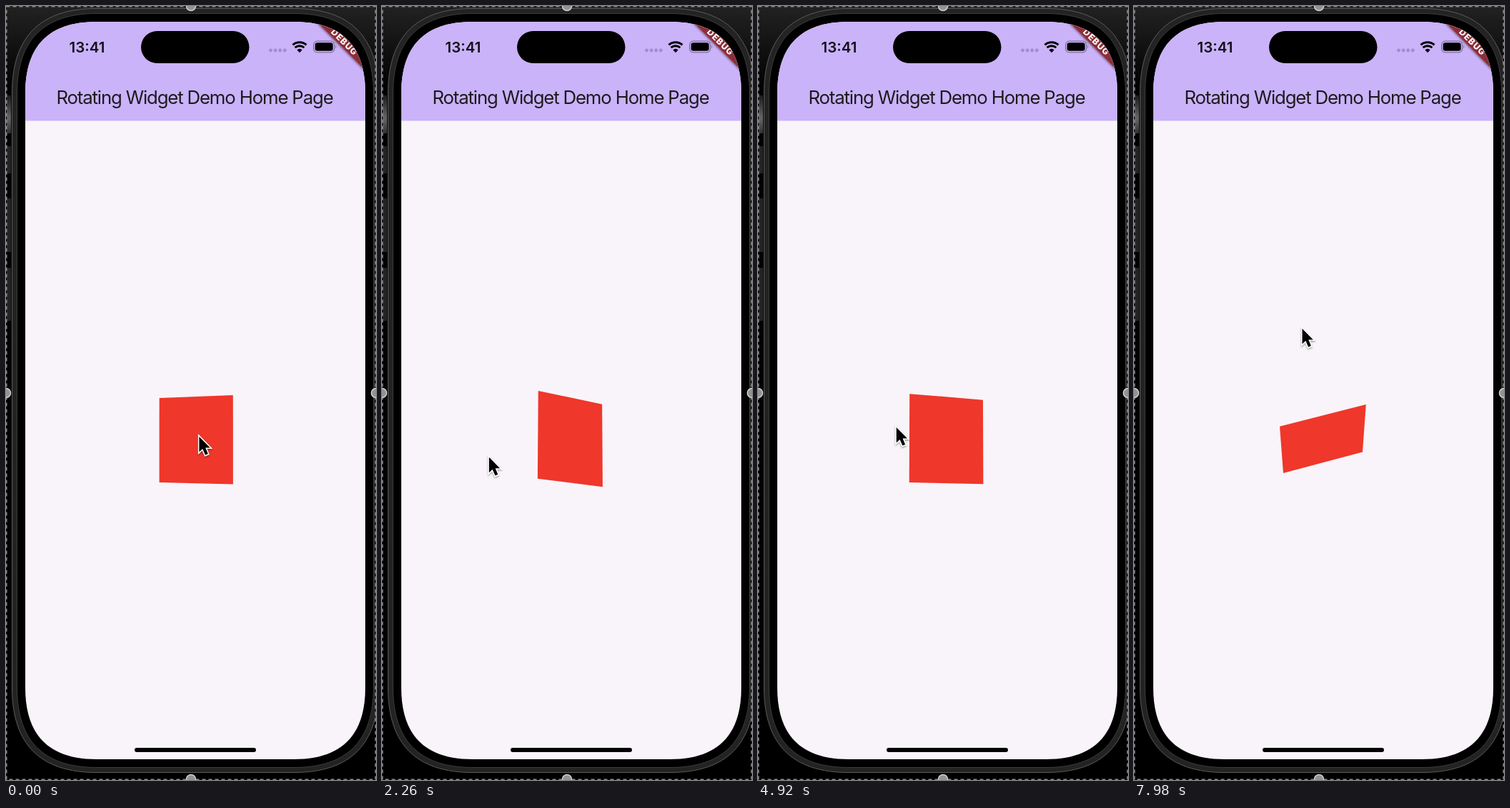
Animation, 518 px wide and 1082 px high, one loop 8 s. Source, as an HTML page:

```html
<!DOCTYPE html>
<html lang="en">
<head>
<meta charset="utf-8">
<title>Rotating Widget Demo</title>
<style>
html, body { margin: 0; width: 100%; height: 100%; overflow: hidden; background: #000; }
svg { display: block; width: 518px; height: 1082px; font-family: Inter, Roboto, sans-serif; }
</style>
</head>
<body>
<svg viewBox="0 0 518 1082">
  <defs>
    <clipPath id="screen"><path data-inset="0"/></clipPath>
    <linearGradient id="desk" x2="0" y2="1">
      <stop stop-color="#222"/><stop offset="1" stop-color="#000"/>
    </linearGradient>
    <linearGradient id="key" x2="0" y2="1">
      <stop stop-color="#1c1c1c"/><stop offset=".6" stop-color="#666"/><stop offset="1" stop-color="#333"/>
    </linearGradient>
    <filter id="shade" x="-50%" y="-50%" width="200%" height="200%">
      <feDropShadow dx="0" dy="1.5" stdDeviation="1.3" flood-opacity=".4"/>
    </filter>
  </defs>
  <rect width="518" height="1082"/>
  <rect width="518" height="120" fill="url(#desk)"/>

  <!-- side buttons and phone body -->
  <path d="M1 125h6v53h-6z" fill="url(#key)"/>
  <path d="M1 196h6v38h-6zM1 269h6v75h-6zM1 366h6v74h-6z" fill="#252525"/>
  <path data-inset="18.5" fill="#232323" stroke="#5c5c5c"/>
  <path data-inset="11.5" stroke="#3c3c3c"/>

  <g clip-path="url(#screen)">
    <path d="M27 22h476v1031h-476z" fill="#f9f4fa"/>
    <path d="M27 22h476v138.500h-476z" fill="#cab3f9"/>
    <g transform="translate(474 50.500) rotate(45)">
      <path d="M-80 -7.500h160v15h-160z" fill="#8d2f37" filter="url(#shade)"/>
      <text y="4.400" text-anchor="middle" font-size="12" font-weight="800" letter-spacing="1" fill="#fff">DEBUG</text>
    </g>
  </g>

  <!-- status bar and title -->
  <text x="113.500" y="64.500" text-anchor="middle" font-size="20.500" font-weight="600" fill="#14111a">13:41</text>
  <rect x="189" y="35" width="151.500" height="45" rx="22.500"/>
  <path d="M370.500 62h20" stroke="#a18ccd" stroke-width="4.800" stroke-linecap="round" stroke-dasharray="0 6.600"/>
  <path d="M401.500 54.400a14.500 14.500 0 0 1 19 0M404.600 58.200a9.800 9.800 0 0 1 12.800 0" fill="none" stroke="#000" stroke-width="3"/>
  <path d="M407.400 61.400a5.500 5.500 0 0 1 7.200 0l-3.600 3.900z"/>
  <rect x="430.700" y="49.200" width="29" height="15.600" rx="5" fill="none" stroke="#82709f" stroke-width="1.300"/>
  <rect x="432.700" y="51.200" width="25" height="11.600" rx="3.300"/>
  <path d="M461.300 54.500q2.400 2.500 0 5z" fill="#82709f"/>
  <text x="264" y="137" text-anchor="middle" font-size="25.800" letter-spacing="-1.170" fill="#1d1b20">Rotating Widget Demo Home Page</text>
  <rect x="180" y="1037" width="170" height="6" rx="3"/>

  <polygon id="card" fill="#ef372b"/>
  <g id="cursor">
    <path d="M0 0V21.500L4.800 17L8.600 25.700L12.400 24.100L8.800 15.600H15.300Z" stroke="#fff" stroke-width="3" paint-order="stroke" filter="url(#shade)"/>
  </g>

  <!-- selection frame -->
  <rect x=".5" y=".5" width="517" height="1081" fill="none" stroke="#8c8c8c" stroke-width="2" stroke-dasharray="5 4"/>
  <g fill="#939393" stroke="#cfcfcf" stroke-width="1.500">
    <circle cx="259" r="6.500"/><circle cx="259" cy="1081" r="6.500"/>
    <circle cy="541" r="6.500"/><circle cx="518" cy="541" r="6.500"/>
  </g>
</svg>
<script>
const LOOP = 8000, SCALE = 1.211, HALF = 50, CX = 264.9, CY = 606.6;
const card = document.getElementById('card'), cursor = document.getElementById('cursor');

// screen outline grown by a margin, with continuous corners
function outline(grow) {
  const w = 476 + 2 * grow, h = 1031 + 2 * grow, e = 100 + grow, k = e * 0.667;
  return `M${27 - grow + e} ${22 - grow}h${w - 2 * e}c${k} 0 ${e} ${e - k} ${e} ${e}`
    + `v${h - 2 * e}c0 ${k} ${k - e} ${e} ${-e} ${e}`
    + `h${2 * e - w}c${-k} 0 ${-e} ${k - e} ${-e} ${-e}`
    + `v${2 * e - h}c0 ${-k} ${e - k} ${-e} ${e} ${-e}z`;
}
for (const p of document.querySelectorAll('[data-inset]')) p.setAttribute('d', outline(+p.dataset.inset));

// time, tilt about x, turn about y, cursor x, cursor y
const keys = [
  [0, -0.012, 0.552, 270.5, 602],
  [1660, -0.138, -0.52, 149.5, 626],
  [3060, -0.231, -0.832, 157.5, 633],
  [4180, -0.206, -0.65, 197.5, 621],
  [5720, 0.126, -0.495, 189.5, 545],
  [6840, 0.71, -0.547, 192.5, 472],
  [7980, 0.997, -0.301, 235.5, 451]
];

function slope(i, c) {
  const p = keys[Math.max(i - 1, 0)], k = keys[i], n = keys[Math.min(i + 1, keys.length - 1)];
  // flat at turning points, so the path never overshoots
  if ((k[c] - p[c]) * (n[c] - k[c]) < 0) return 0;
  return (n[c] - p[c]) / (n[0] - p[0]);
}

function valueAt(t, c) {
  const end = keys.length - 1;
  if (t >= keys[end][0]) return keys[end][c];
  const i = keys.findIndex(k => k[0] > t) - 1;
  const a = keys[i], b = keys[i + 1], d = b[0] - a[0], u = (t - a[0]) / d, v = 1 - u;
  return v * v * ((1 + 2 * u) * a[c] + u * d * slope(i, c))
       + u * u * ((1 + 2 * v) * b[c] - v * d * slope(i + 1, c));
}

function project(x, y, tilt, turn) {
  const z = -x * Math.sin(turn);
  const depth = y * Math.sin(tilt) + z * Math.cos(tilt);
  const k = SCALE / (1 + 0.001 * depth);
  return [CX + k * x * Math.cos(turn), CY + k * (y * Math.cos(tilt) - z * Math.sin(tilt))];
}

function draw(now) {
  const t = now % LOOP;
  const [tilt, turn, x, y] = [1, 2, 3, 4].map(c => valueAt(t, c));
  const corners = [[-1, -1], [1, -1], [1, 1], [-1, 1]];
  card.setAttribute('points', corners.map(([i, j]) => project(i * HALF, j * HALF, tilt, turn)).join(' '));
  cursor.setAttribute('transform', `translate(${x} ${y})`);
}

const start = performance.now();
function tick() {
  draw(performance.now() - start);
  requestAnimationFrame(tick);
}
tick();
</script>
</body>
</html>
```
